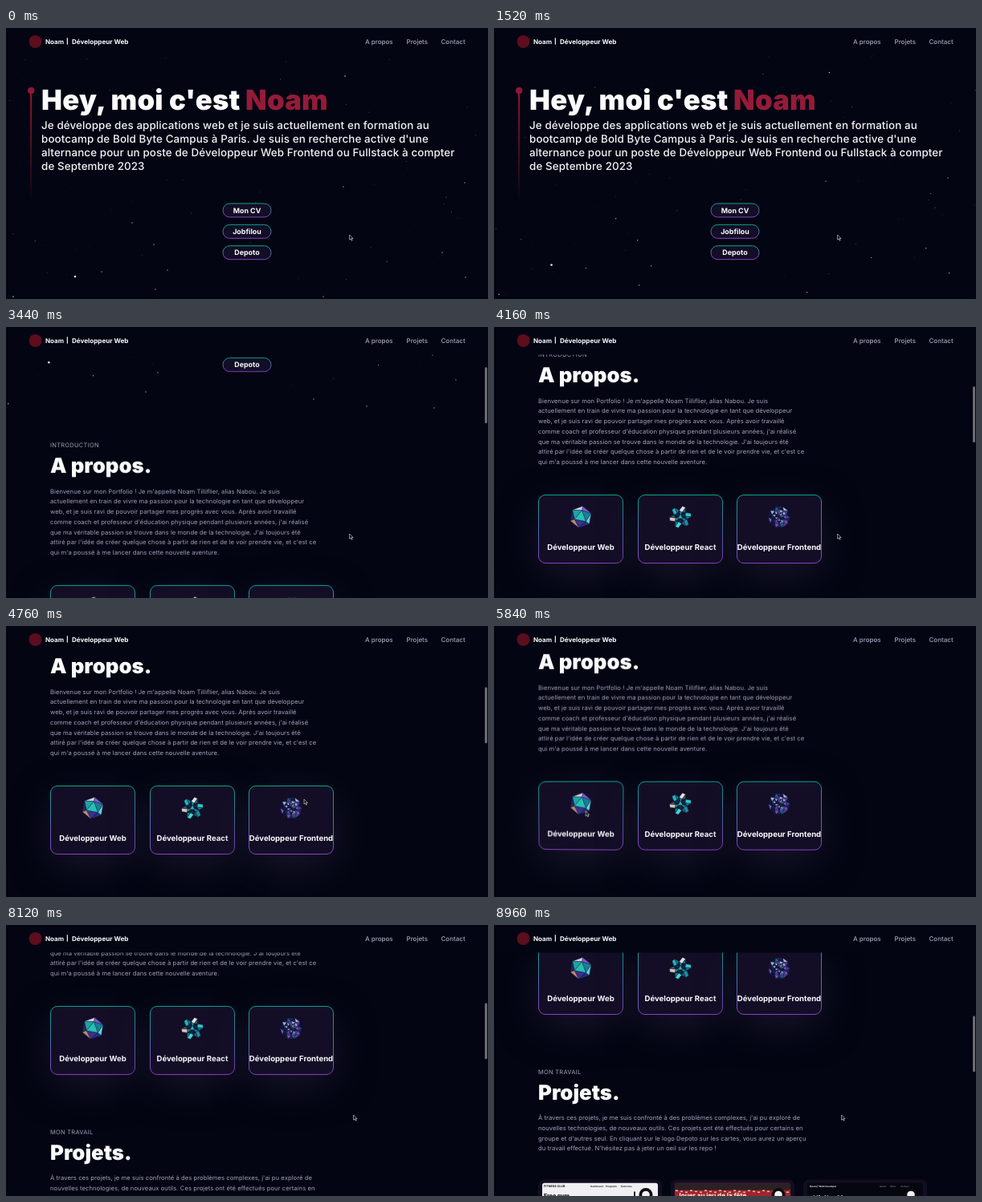
An HTML page with a canvas for the animation above (9000 ms loop, 600x338 px).

```html
<!DOCTYPE html>
<html lang="fr">
<head>
<meta charset="utf-8">
<title>Portfolio</title>
<style>
  html, body { margin: 0; width: 600px; height: 338px; overflow: hidden; background: #030512; }
  #stage { position: relative; width: 600px; height: 338px; overflow: hidden; background: #030512; }
  #stage * { position: absolute; }
  #page { left: 0; top: 0; width: 600px; height: 1100px; will-change: transform; }
  svg { left: 0; top: 0; overflow: visible; }
  text { font-family: Inter, "Open Sans", sans-serif; text-rendering: geometricPrecision; white-space: pre; }
  .card { top: 555px; width: 106px; height: 86px; border-radius: 8.5px; box-shadow: 0 15px 51px -6px #1b1930; }
  #bar { left: 596px; top: 0; width: 3px; height: 70px; border-radius: 1.5px; background: #6c6c72; }
</style>
</head>
<body>
<div id="stage">
  <div id="page">
    <canvas id="sky" width="600" height="338"></canvas>
    <svg id="doc" width="600" height="1100">
      <defs>
        <linearGradient id="edge" x1="0" y1="0" x2="0" y2="1">
          <stop offset="0" stop-color="#08a58c"/><stop offset="1" stop-color="#8b3fc4"/>
        </linearGradient>
        <linearGradient id="stem" gradientUnits="userSpaceOnUse" x1="0" y1="78" x2="0" y2="222">
          <stop offset="0" stop-color="#8f1834"/><stop offset="1" stop-color="#8f1834" stop-opacity="0"/>
        </linearGradient>
      </defs>
    </svg>
  </div>
  <svg id="nav" width="600" height="338"></svg>
  <div id="bar"></div>
  <svg id="mouse" width="8" height="10">
    <path d="M0 0V6.2L1.5 4.9L2.6 7.2L3.6 6.7L2.6 4.5H4.5Z" fill="#0b0b0d" stroke="#e8e8ea" stroke-width=".6"/>
  </svg>
</div>
<script>
const LOOP = 9000;
const LILAC = '#a5a1bd', WHITE = '#fbfbfd', RED = '#941b39', PANEL = '#130e26';
const $ = id => document.getElementById(id);

function el(parent, tag, attrs, content) {
  const node = document.createElementNS('http://www.w3.org/2000/svg', tag);
  for (const k in attrs) node.setAttribute(k, attrs[k]);
  if (content) node.textContent = content;
  return parent.appendChild(node);
}

function label(parent, x, y, str, size, weight, fill, more) {
  return el(parent, 'text', { x, y, 'font-size': size, 'font-weight': weight, fill, ...more }, str);
}

function box(parent, x, y, width, height, rx, fill, more) {
  return el(parent, 'rect', { x, y, width, height, rx, fill, ...more });
}

function random(seed) {
  return () => (seed = (seed * 16807) % 2147483647) / 2147483647;
}

// Hero
const doc = $('doc'), middle = { 'text-anchor': 'middle' };
box(doc, 30, 78, 2.2, 144, 0, 'url(#stem)');
el(doc, 'circle', { cx: 31.2, cy: 78, r: 4.3, fill: '#8f1834' });
label(doc, 44, 101.7, "Hey, moi c'est", 34.6, 900, WHITE, { 'letter-spacing': .3 });
label(doc, 298, 101.7, 'Noam', 34.6, 900, RED, { 'letter-spacing': .3 });
[
  'Je développe des applications web et je suis actuellement en formation au',
  'bootcamp de Bold Byte Campus à Paris. Je suis en recherche active d\'une',
  'alternance pour un poste de Développeur Web Frontend ou Fullstack à compter',
  'de Septembre 2023'
].forEach((s, i) => label(doc, 44, 126.3 + i * 17, s, 13.4, 500, '#f3f2f8', { 'letter-spacing': .1 }));
['Mon CV', 'Jobfilou', 'Depoto'].forEach((s, i) => {
  const y = 218.9 + i * 26.4;
  box(doc, 270, y, 60, 17, 8.5, PANEL, { stroke: 'url(#edge)' });
  label(doc, 300, y + 11.6, s, 8.9, 700, WHITE, middle);
});

// Text sections
function section(top, kicker, title, lines) {
  label(doc, 55, top, kicker, 7.5, 400, LILAC, { 'letter-spacing': .25 });
  label(doc, 55, top + 32, title, 25.8, 900, WHITE);
  lines.forEach((s, i) =>
    label(doc, 55, top + 57.6 + i * 12.75, s, 7.65, 400, LILAC, { 'letter-spacing': .05 }));
}
section(383, 'INTRODUCTION', 'A propos.', [
  "Bienvenue sur mon Portfolio ! Je m'appelle Noam Tilliflier, alias Nabou. Je suis",
  'actuellement en train de vivre ma passion pour la technologie en tant que développeur',
  'web, et je suis ravi de pouvoir partager mes progrès avec vous. Après avoir travaillé',
  "comme coach et professeur d'éducation physique pendant plusieurs années, j'ai réalisé",
  "que ma véritable passion se trouve dans le monde de la technologie. J'ai toujours été",
  "attiré par l'idée de créer quelque chose à partir de rien et de le voir prendre vie, et c'est ce",
  "qui m'a poussé à me lancer dans cette nouvelle aventure."
]);
section(714.5, 'MON TRAVAIL', 'Projets.', [
  "À travers ces projets, je me suis confronté à des problèmes complexes, j'ai pu exploré de",
  'nouvelles technologies, de nouveaux outils. Ces projets ont été effectués pour certains en',
  "groupe et d'autres seul. En cliquant sur le logo Depoto sur les cartes, vous aurez un aperçu",
  "du travail effectué. N'hésitez pas à jeter un oeil sur les repo !"
]);

// Faceted icons, centred on the origin
const polar = (r, deg) => [r * Math.cos(deg * Math.PI / 180), r * Math.sin(deg * Math.PI / 180)];
const facet = (g, fill, ...pts) =>
  el(g, 'polygon', { points: pts.join(' '), fill, stroke: '#101436', 'stroke-width': .35 });

function gem(g) {
  const out = i => polar(13.8, i * 60 - 80), inn = j => polar(8.4, j * 120 - 80);
  const side = ['#7f5bd0', '#d8cfe6', '#23307f', '#5fd3dc', '#2b2464', '#b88a70'];
  const face = ['#187f97', '#3b2f8c', '#1aa6a4'];
  for (let j = 0; j < 3; j++) {
    facet(g, face[j], inn(j), inn(j + 1), out(2 * j + 1));
    facet(g, side[2 * j], inn(j), out(2 * j), out(2 * j + 1));
    facet(g, side[2 * j + 1], inn(j), out(2 * j), out(2 * j - 1));
  }
  facet(g, '#27bfb4', inn(0), inn(1), inn(2));
}

function star(g) {
  const light = ['#e8e2d8', '#31c9c6', '#1b8fa4', '#46d8d0', '#d9c7b4', '#27b3b8'];
  for (let i = 0; i < 6; i++) {
    const a = i * 60 - 70, left = polar(8.4, a - 30), right = polar(8.4, a + 30);
    facet(g, light[i], left, polar(13.8, a - 9), polar(13.4, a + 9), polar(6, a));
    facet(g, i % 2 ? '#147a8c' : '#27606f', polar(6, a), polar(13.4, a + 9), right);
    facet(g, i % 2 ? '#16324f' : '#1d8f9c', [0, 0], left, polar(6, a));
    facet(g, '#0c2138', [0, 0], polar(6, a), right);
  }
  facet(g, '#2bb5b4', polar(3.4, -90), polar(3.4, 30), polar(3.4, 150));
}

function ball(g) {
  const rnd = random(77);
  const tones = ['#1d2350', '#4a3f9c', '#7a55b8', '#2aa3b5', '#10183a', '#a9b9d6', '#22607f', '#10183a'];
  const pick = () => tones[Math.floor(rnd() * tones.length)];
  el(g, 'circle', { r: 13, fill: '#141a40' });
  [[13.6, 9.2], [9.2, 5], [5, 0]].forEach(([r, q], ring) => {
    for (let i = 0; i < 10; i++) {
      const a = i * 36 + ring * 18;
      facet(g, pick(), polar(r, a), polar(r, a + 36), polar(q, a + 18));
      facet(g, pick(), polar(r, a), polar(q, a + 18), polar(q, a - 18));
    }
  });
}

// Service cards
const CARD_X = [55, 178.5, 302];
const cards = [['Web', gem], ['React', star], ['Frontend', ball]].map(([name, draw], i) => {
  const div = document.createElement('div');
  div.className = 'card';
  div.style.left = CARD_X[i] + 'px';
  $('page').appendChild(div);
  const svg = el(div, 'svg', { width: 106, height: 86 });
  box(svg, .5, .5, 105, 85, 8.5, PANEL, { stroke: 'url(#edge)' });
  draw(el(svg, 'g', { transform: 'translate(53 28)' }));
  label(svg, 53, 69, 'Développeur ' + name, 9.6, 700, WHITE, middle);
  return div;
});

// Project cards
const ink = '#17171c', top0 = 846.5;
[55, 220, 385].forEach((x, i) => {
  box(doc, x, top0, 154, 150, 7, '#110d22');
  box(doc, x + 5, top0 + 4.2, 144, 98, 3, ['#f0f0f2', '#a3232f', '#05060f'][i]);
  const tiny = (dx, dy, s, size, weight, fill) => label(doc, x + dx, top0 + dy, s, size, weight, fill);
  if (i === 0) {
    tiny(7, 9.4, 'FITNESS CLUB', 3.7, 700, ink);
    ['Dashboard', 'Programs', 'Exercises'].forEach((s, k) => tiny(65 + k * 19, 9.2, s, 3, 600, ink));
    tiny(7, 22.5, 'Free gym', 7, 800, ink);
    box(doc, x + 119, top0 + 15, 2, 40, 0, '#2b271c');
  } else if (i === 1) {
    box(doc, x + 5, top0 + 4.2, 144, 9, 3, '#2c2024');
    for (let k = 0; k < 24; k++) box(doc, x + 6 + k * 6, top0 + 13 + k % 3, 3, 1.6, 0, '#d9b79a');
    tiny(8, 22, 'Jouer au jeu de la fête', 8, 800, '#f1e4d6');
  } else {
    tiny(8, 9.4, 'Noam | Web Developer', 3, 700, '#dcdce4');
    ['About', 'Work', 'Contact'].forEach((s, k) => tiny(95 + k * 13, 9.2, s, 2.8, 500, '#85839a'));
    tiny(12, 26, "Hi, I'm Noam", 9, 900, WHITE);
  }
  el(doc, 'circle', { cx: x + 134, cy: top0 + 19, r: 8.5, fill: '#0c0b12' });
  el(doc, 'circle', { cx: x + 134, cy: top0 + 19, r: 4.8, fill: '#f2f2f4' });
});

// Header
const nav = $('nav');
box(nav, 0, 0, 600, 34.5, 0, '#030512');
el(nav, 'circle', { cx: 36.5, cy: 17, r: 8, fill: '#5c0d1e' });
label(nav, 49, 19.7, 'Noam', 8, 700, WHITE);
label(nav, 75, 19.2, '|', 7, 800, WHITE);
label(nav, 82, 19.7, 'Développeur Web', 8.1, 700, WHITE);
[[447, 'A propos'], [498.5, 'Projets'], [541.5, 'Contact']].forEach(([x, s]) =>
  label(nav, x, 19.6, s, 8, 500, LILAC));

// Stars: x, y, drift per second, radius, brightness
const stars = [
  [86, 310, 9.5, 1.3, 1], [422, 60, 3, .8, .8], [385, 96, 4, .6, .6], [474, 291, 3, .6, .7],
  [571, 193, 4, .7, .7], [548, 211, 3, .5, .6], [157, 243, 3.5, .7, .7], [184, 270, 3.5, .7, .7],
  [119, 304, 3, .7, .7], [420, 198, 4.5, .7, .7], [9, 335, 1.8, .8, .8], [186, 326, 3.5, .7, .7],
  [201, 302, 3.5, .7, .7], [395, 335, 3.5, .7, .7], [461, 344, 3.5, .7, .7],
  [545, 346, 3.5, .7, .7], [543, 280, 3.5, .7, .7], [572, 311, 3.5, .7, .7]
];
const rnd = random(4211);
for (let i = 0; i < 95; i++)
  stars.push([rnd() * 640, rnd() * 375, 1.5 + rnd() * 3.5, .3 + rnd() * .25, .15 + rnd() * .4]);

const ctx = $('sky').getContext('2d');
function drawSky(sec) {
  ctx.clearRect(0, 0, 600, 338);
  ctx.fillStyle = '#f0e6ea';
  for (const [x, y, v, r, a] of stars) {
    ctx.globalAlpha = a;
    ctx.beginPath();
    ctx.arc(x - v * sec, y - v * sec, r, 0, 7);
    ctx.fill();
  }
}

// Monotone smooth curve through [time, value] points
function curve(pts) {
  const n = pts.length - 1;
  const d = pts.slice(1).map((p, i) => (p[1] - pts[i][1]) / (p[0] - pts[i][0]));
  const m = pts.map((p, i) =>
    i === 0 ? 0 : i === n ? d[n - 1] : d[i - 1] * d[i] <= 0 ? 0 : 2 * d[i - 1] * d[i] / (d[i - 1] + d[i]));
  return t => {
    if (t <= pts[0][0]) return pts[0][1];
    if (t >= pts[n][0]) return pts[n][1];
    const i = pts.findIndex(p => p[0] > t) - 1;
    const h = pts[i + 1][0] - pts[i][0], u = (t - pts[i][0]) / h, w = 1 - u;
    return pts[i][1] * w * w * (1 + 2 * u) + pts[i + 1][1] * u * u * (3 - 2 * u)
      + h * u * w * (m[i] * w - m[i + 1] * u);
  };
}

const scrollAt = curve([[1900, 0], [2100, 18], [2320, 57], [2700, 120], [3060, 182], [3440, 233],
  [3800, 300], [4100, 342], [4420, 356], [4900, 356], [5100, 361.3], [7250, 361.3],
  [7600, 392], [8120, 454], [8560, 500], [8960, 529]]);
const barAt = curve([[1880, 0], [1960, 1], [5350, 1], [5620, 0], [7200, 0], [7280, 1]]);
const path = [[4250, 427.6, 258], [4560, 371, 216], [4760, 371, 216], [5050, 330, 240], [5400, 235, 238],
  [5700, 110, 238], [5950, 122, 226], [6250, 240, 236], [6520, 432.6, 237]];
const mouseX = curve([...path.map(p => [p[0], p[1]]), [LOOP, 432.6]]);
const mouseY = curve([...path.map(p => [p[0], p[2]]), [LOOP, 237]]);
const clamp = v => Math.max(0, Math.min(1, v));

function tilt(t, mx, my) {
  const on = clamp((t - 4760) / 300);
  cards.forEach((card, i) => {
    const x = mx - CARD_X[i], y = my - 555;
    const w = on * clamp(Math.min(x, 106 - x, y, 86 - y) / 14);
    const rx = (y / 86 - .5) * 45 * w, ry = (.5 - x / 106) * 45 * w;
    card.style.transform = w ? `perspective(425px) rotateX(${rx}deg) rotateY(${ry}deg)` : 'none';
  });
}

function render(t) {
  const scroll = scrollAt(t), mx = mouseX(t), my = mouseY(t);
  $('page').style.transform = `translateY(${-scroll}px)`;
  $('bar').style.transform = `translateY(${scroll * .214}px)`;
  $('bar').style.opacity = barAt(t);
  $('mouse').style.transform = `translate(${mx}px, ${my}px)`;
  if (scroll < 340) drawSky(t / 1000);
  tilt(t, mx, my + scroll);
}

const start = performance.now();
function tick() {
  render((performance.now() - start) % LOOP);
  requestAnimationFrame(tick);
}
tick();
</script>
</body>
</html>
```
